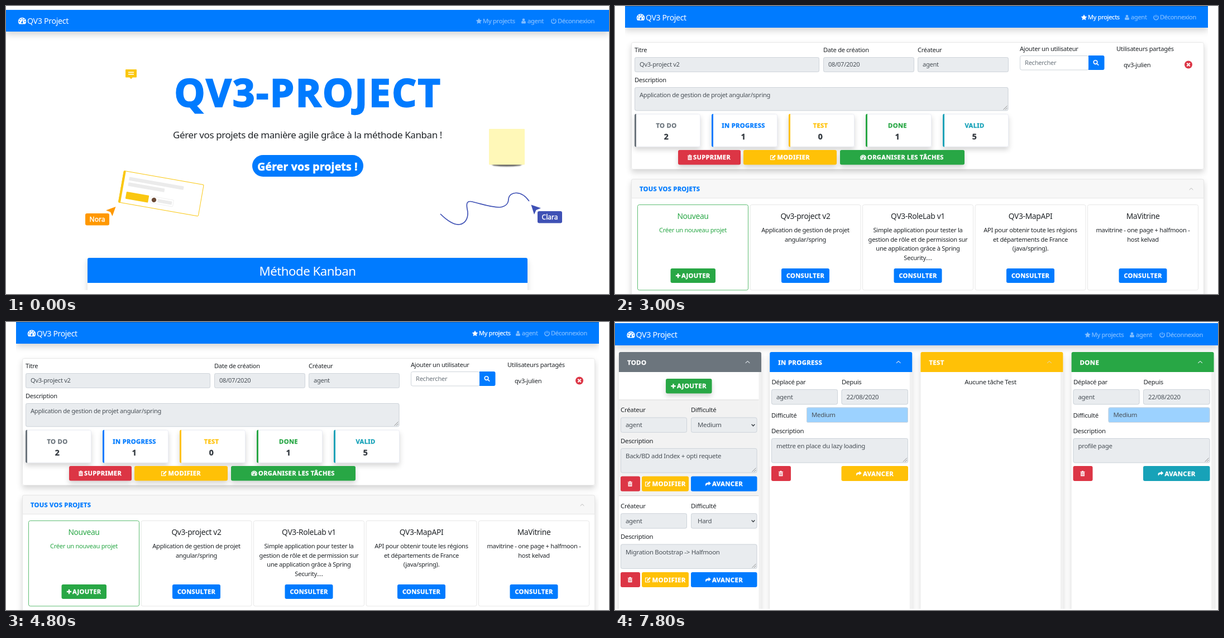
Write an HTML page with a canvas that moves like this. It is 1080 px wide and 518 px high and loops after 9 s.

```html
<!DOCTYPE html>
<html lang="fr">
<head>
<meta charset="utf-8">
<title>QV3 Project</title>
<style>
html, body { margin: 0; width: 100%; height: 100%; overflow: hidden; background: #fff; }
canvas { display: block; }
</style>
</head>
<body>
<canvas id="stage" width="1080" height="518"></canvas>
<script>
const ctx = document.getElementById('stage').getContext('2d');
const FONT = '"Noto Sans", "Open Sans", sans-serif';
const BLUE = '#007bff', GREEN = '#28a745', YELLOW = '#ffc107', RED = '#dc3545';
const TEAL = '#17a2b8', GREY = '#6c757d', INDIGO = '#3f51b5', ORANGE = '#ff9800', GOLD = '#fac710';
const INK = '#212529', FIELD = '#e9ecef', EDGE = '#ced4da', SOFT = '#495057';
const USER = 'agent';

const dot = (x, y, r) =>
  `M${x - r} ${y}a${r} ${r} 0 1 0 ${2 * r} 0a${r} ${r} 0 1 0 ${-2 * r} 0Z`;

// Icons on a 16 x 16 grid: filled path, stroked path, stroke width.
const ICONS = {
  gauge: { fill: 'M1.8 14Q0 11.5 0 9A8 8 0 0 1 16 9Q16 11.5 14.2 14Z' + dot(2.6, 9, 1.1) +
    dot(4.2, 5.2, 1.1) + dot(8, 3.6, 1.1) + dot(11.8, 5.2, 1.1) + dot(13.4, 9, 1.1) +
    'M8.6 6L9.6 6.3 8.9 9.3A1.9 1.9 0 1 1 7.8 9Z' },
  star: { fill: 'M8 .3L10.4 5.2 15.8 6 11.9 9.8 12.8 15.2 8 12.7 3.2 15.2 4.1 9.8.2 6 5.6 5.2Z' },
  user: { fill: dot(8, 4.6, 3.6) + 'M2 13Q2 8 4.8 7.8Q8 10.4 11.2 7.8Q14 8 14 13Q14 15 12 15H4Q2 15 2 13Z' },
  power: { line: 'M4.6 3.4A6 6 0 1 0 11.4 3.4M8 1V8', w: 2 },
  trash: { fill: 'M2 3H5.3L6.2 1H9.8L10.7 3H14V4.5H2ZM3 5H13V15H3ZM5 7V13H6V7ZM7.5 7V13H8.5V7ZM10 7V13H11V7Z' },
  plus: { fill: 'M6.3 2H9.7V6.3H14V9.7H9.7V14H6.3V9.7H2V6.3H6.3Z' },
  edit: { fill: 'M5.5 8.2L12.5 1.2 15.2 3.9 8.2 10.9H5.5Z', line: 'M12 10V14H1.5V3.5H8', w: 1.7 },
  share: { fill: 'M9.5 1.5L15.8 7 9.5 12.5V9.4Q3.6 9 2.6 14.5Q-2 4.8 9.5 4.6Z' },
  search: { line: dot(6.6, 6.6, 4.8) + 'M10.2 10.2L14.8 14.8', w: 2.4 },
  cross: { line: 'M4 4L12 12M12 4L4 12', w: 3 },
  up: { line: 'M2 11L8 5.5 14 11', w: 1.7 },
  down: { line: 'M3 5.5L8 10.5 13 5.5', w: 2.6 }
};

function icon(name, cx, cy, size, color) {
  const { fill, line, w } = ICONS[name];
  ctx.save();
  ctx.translate(cx - size / 2, cy - size / 2);
  ctx.scale(size / 16, size / 16);
  ctx.fillStyle = ctx.strokeStyle = color;
  if (fill) ctx.fill(new Path2D(fill), 'evenodd');
  if (line) {
    ctx.lineWidth = w;
    ctx.stroke(new Path2D(line));
  }
  ctx.restore();
}

// y is the middle of the capitals; gap and weight are in em.
function text(str, x, y, size, color = INK, { bold, align = 'left', gap, weight = bold ? 0.03 : 0 } = {}) {
  const caps = str === str.toUpperCase();
  const em = gap ?? (bold ? (caps ? 0.03 : 0.008) : -0.024);
  ctx.font = `${bold ? 700 : 400} ${size}px ${FONT}`;
  ctx.letterSpacing = em * size + 'px';
  ctx.textAlign = align;
  ctx.fillStyle = ctx.strokeStyle = color;
  ctx.fillText(str, x, y + size * 0.36);
  if (weight) {
    ctx.lineWidth = weight * size;
    ctx.lineJoin = 'miter';
    ctx.miterLimit = 3;
    ctx.strokeText(str, x, y + size * 0.36);
  }
}
const center = (str, x, y, size, color, opt) => text(str, x, y, size, color, { ...opt, align: 'center' });

function box(x, y, w, h, { fill = '#fff', edge, r = 3, shadow, line = 0.75 } = {}) {
  ctx.save();
  if (shadow) {
    ctx.shadowColor = 'rgba(0,0,0,.17)';
    ctx.shadowBlur = shadow;
    ctx.shadowOffsetY = shadow / 2;
  }
  ctx.fillStyle = fill;
  ctx.beginPath();
  ctx.roundRect(x, y, w, h, r);
  ctx.fill();
  ctx.restore();
  if (edge) {
    ctx.strokeStyle = edge;
    ctx.lineWidth = line;
    ctx.beginPath();
    ctx.roundRect(x + 0.5, y + 0.5, w - 1, h - 1, r);
    ctx.stroke();
  }
}

function poly(points, color) {
  ctx.fillStyle = color;
  ctx.beginPath();
  points.forEach(([x, y]) => ctx.lineTo(x, y));
  ctx.fill();
}

function clipTo(x, y, w, h) {
  ctx.beginPath();
  ctx.rect(x, y, w, h);
  ctx.clip();
}

function field(x, y, w, h, str, size, { fill = FIELD, color = SOFT, pad = 9 } = {}) {
  box(x, y, w, h, { fill, edge: EDGE, line: 1 });
  text(str, x + pad, y + Math.min(h / 2, 14), size, color);
}

function area(x, y, w, h, str, size) {
  field(x, y, w, h, str, size);
  ctx.strokeStyle = '#777';
  ctx.lineWidth = 0.8;
  ctx.beginPath();
  for (const d of [7, 3.5]) {
    ctx.moveTo(x + w - 2 - d, y + h - 2);
    ctx.lineTo(x + w - 2, y + h - 2 - d);
  }
  ctx.stroke();
}

function button(x, y, w, h, fill, str, size, name, iconX, textX, shadow) {
  box(x, y, w, h, { fill, shadow });
  const mid = y + h / 2;
  if (name) icon(name, iconX, mid, 11, '#fff');
  if (!str) return;
  if (textX) text(str, textX, mid, size, '#fff', { bold: true });
  else center(str, x + w / 2, mid, size, '#fff', { bold: true });
}

function navbar(x, y, w, h, mid, logoX, size, links, active) {
  box(x, y, w, h, { fill: BLUE, r: 0, shadow: 11 });
  icon('gauge', logoX, mid, 14.5, '#fff');
  text('QV3 Project', logoX + 9, mid, size * 1.27, '#fff');
  const labels = ['My projects', USER, 'Déconnexion'];
  ['star', 'user', 'power'].forEach((name, i) => {
    const color = active && i === 0 ? '#fff' : '#80bdff';
    icon(name, links[i] - 7, mid, i === 1 ? 10.5 : 11, color);
    text(labels[i], links[i], mid, size, color, { weight: 0.02 });
  });
}

function noteCard() {
  ctx.save();
  ctx.translate(211, 295.8);
  ctx.rotate(Math.PI / 18);
  box(0, 0, 146, 58.5, { edge: GOLD, r: 2, line: 1 });
  box(0, 0, 4, 58.5, { fill: GOLD, r: 2 });
  box(12, 9.5, 99, 6.5, { fill: '#ebebeb', r: 1 });
  box(12, 19.5, 66, 6.5, { fill: '#ebebeb', r: 1 });
  box(11.5, 36.5, 41, 13, { fill: GOLD, r: 1 });
  box(56, 36.5, 42, 13, { edge: '#ebebeb', r: 1 });
  box(58.2, 38.7, 8.4, 8.4, { fill: '#6b4a35', r: 4.2 });
  box(69, 40, 26, 6, { fill: '#ebebeb', r: 1 });
  ctx.restore();
}

function tag(x, y, w, name, color) {
  box(x, y, w, 21.5, { fill: color });
  center(name, x + w / 2, y + 10.5, 12, '#fff', { gap: 0, weight: 0.035 });
}

function home() {
  clipTo(0, 0, 1080, 511);
  navbar(0, 7, 1080, 39, 27, 29, 11.2, [854, 934, 988]);

  box(214, 114, 20, 14.5, { fill: GOLD, r: 1 });
  poly([[221, 128], [227, 128], [224, 131.5]], GOLD);
  box(219, 118.5, 10, 1.6, { r: 0 });
  box(219, 122, 10, 1.6, { r: 0 });

  center('QV3-PROJECT', 541, 156, 69, BLUE, { bold: true, gap: 0.038, weight: 0.035 });
  center('Gérer vos projets de manière agile grâce à la méthode Kanban !', 540, 232, 17);
  box(441, 268, 199, 39, { fill: BLUE, r: 19.5 });
  center('Gérer vos projets !', 540, 288.5, 19.5, '#fff', { bold: true });

  ctx.save();
  ctx.filter = 'blur(1.3px)';
  ctx.fillStyle = 'rgba(0,0,0,.65)';
  ctx.fill(new Path2D('M868 283H926L921 287Q897 290 873 287Z'));
  ctx.restore();
  box(865, 221, 64, 64.5, { fill: '#fff8b8', r: 1 });

  noteCard();
  poly([[196.5, 361], [179, 367.5], [187, 370.5], [190.5, 378]], ORANGE);
  tag(142, 373, 43, 'Nora', ORANGE);

  ctx.strokeStyle = INDIGO;
  ctx.lineWidth = 1.7;
  ctx.stroke(new Path2D('M778 374C790 386 803 394 812 393C826 391 829 376 826 365' +
    'C824 354 826 350 835 352C852 356 868 362 884 362C896 361 900 354 900 347C902 333 923 331 937 351'));
  poly([[940.5, 357.5], [958, 363.5], [949.5, 367], [946, 375]], INDIGO);
  tag(952, 369, 44, 'Clara', INDIGO);

  box(146, 453, 788, 90, { shadow: 11 });
  box(146, 453, 788, 45, { fill: BLUE, r: [3, 3, 0, 0] });
  center('Méthode Kanban', 540, 476.5, 22.3, '#fff');
}

function projects() {
  const S = 11.1;
  clipTo(18, 0, 1044, 518);
  navbar(18, 0, 1044, 39, 20.5, 46, 11, [847, 924, 976], true);
  box(18, 0, 1044, 1, { fill: '#0a63c4', r: 0 });

  box(29, 65, 1026, 229, { edge: '#dfdfdf', shadow: 11 });
  [['Titre', 35, 79], ['Date de création', 373, 79], ['Créateur', 542, 79], ['Description', 35, 133],
    ['Ajouter un utilisateur', 725, 77.5], ['Utilisateurs partagés', 898, 77.5]]
    .forEach(([str, x, y]) => text(str, x, y, S));
  field(35, 92, 331, 27, 'Qv3-project v2', S);
  field(373, 92, 163, 27, '08/07/2020', S);
  field(542, 92, 163, 27, USER, S);
  area(35, 146, 669.5, 42.5, 'Application de gestion de projet angular/spring', S);
  field(725, 89, 124, 26.5, 'Rechercher', S, { fill: '#fff', color: GREY });
  box(848, 89, 28.5, 26, { fill: BLUE, r: [0, 3, 3, 0] });
  icon('search', 861.5, 102, 11, '#fff');
  text('qv3-julien', 911, 106, S);
  box(1020, 98.5, 14, 14, { fill: RED, r: 7 });
  icon('cross', 1027, 105.5, 11, '#fff');

  [['TO DO', 2, GREY], ['IN PROGRESS', 1, BLUE], ['TEST', 0, YELLOW], ['DONE', 1, GREEN], ['VALID', 5, TEAL]]
    .forEach(([name, count, color], i) => {
      const x = 35 + 138 * i;
      box(x, 194, 118, 59.5, { edge: '#e3e6f0', shadow: 10 });
      box(x, 194, 3, 59.5, { fill: color, r: [3, 0, 0, 3] });
      center(name, x + 57, 215, 11.2, color, { bold: true });
      center(String(count), x + 57, 234.5, 14, '#343a40', { bold: true });
    });
  button(113, 259, 112, 26.5, RED, 'SUPPRIMER', S, 'trash', 134, 140, 10);
  button(230, 259, 167, 26.5, YELLOW, 'MODIFIER', S, 'edit', 283, 290.5, 10);
  button(403, 259, 223, 26.5, GREEN, 'ORGANISER LES TÂCHES', S, 'gauge', 444.5, 452, 10);

  box(29, 311, 1026, 240, { edge: '#dfdfdf', shadow: 11 });
  box(29, 311, 1026, 35, { fill: '#f7f7f7', edge: '#dfdfdf', r: [3, 3, 0, 0] });
  text('TOUS VOS PROJETS', 44, 329, S, BLUE, { bold: true });
  icon('up', 1032, 329, 9, '#b5b5b5');

  [['Nouveau', 'Créer un nouveau projet'],
    ['Qv3-project v2', 'Application de gestion de projet', 'angular/spring'],
    ['QV3-RoleLab v1', 'Simple application pour tester la', 'gestion de rôle et de permission sur',
      'une application grâce à Spring', 'Security.…'],
    ['QV3-MapAPI', 'API pour obtenir toute les régions', 'et départements de France', '(java/spring).'],
    ['MaVitrine', 'mavitrine - one page + halfmoon -', 'host kelvad']]
    .forEach(([name, ...lines], i) => {
      const x = 40 + 201.5 * i, mid = x + 99.5, color = i ? INK : GREEN;
      box(x, 357, 199, 154.5, { edge: i ? '#dfdfdf' : GREEN });
      center(name, mid, 378, 13.8, color);
      lines.forEach((line, k) => center(line, mid, 403 + 16.6 * k, S, color));
      if (i) button(mid - 43, 472, 86, 26, BLUE, 'CONSULTER', S);
      else button(99.5, 472, 80.5, 26, GREEN, 'AJOUTER', S, 'plus', 113, 119);
    });
}

function task(y, level, note) {
  const S = 11.4;
  text('Créateur', 10, y, S);
  text('Difficulté', 136, y, S);
  field(10, y + 13.5, 119, 27.5, USER, S);
  field(136, y + 13.5, 118.5, 27.5, level, S, { pad: 12 });
  icon('down', 247.5, y + 27.5, 9, '#343a40');
  text('Description', 10, y + 55.5, S);
  area(10, y + 69, 244.5, 44.5, note, S);
  button(10, y + 119.5, 35, 27, RED, '', S, 'trash', 27);
  button(48, y + 119.5, 84, 27, YELLOW, 'MODIFIER', S, 'edit', 59, 66.5);
  button(136, y + 119.5, 118.5, 27, BLUE, 'AVANCER', S, 'share', 166.5, 174);
}

function movedTask(x, note, color) {
  const S = 11.4;
  text('Déplacé par', x + 3.5, 107.5, S);
  text('Depuis', x + 129, 107.5, S);
  field(x + 3, 121, 119, 27.5, USER, S);
  field(x + 128.5, 121, 119.5, 27.5, '22/08/2020', S);
  text('Difficulté', x + 3, 168, S);
  field(x + 66, 153.5, 182, 27.5, 'Medium', S, { fill: '#9cd2ff' });
  text('Description', x + 3, 196, S);
  area(x + 3, 209, 245, 44.5, note, S);
  button(x + 3, 259, 35, 27, RED, '', S, 'trash', x + 20);
  button(x + 128.5, 259, 119.5, 27, color, 'AVANCER', S, 'share', x + 159.5, x + 167);
}

function board() {
  const S = 11.4;
  clipTo(0, 0, 1080, 516);
  navbar(0, 2, 1080, 40, 23, 28.5, 11.2, [853.5, 933, 987]);

  [['TODO', GREY], ['IN PROGRESS', BLUE], ['TEST', YELLOW], ['DONE', GREEN]].forEach(([name, color], i) => {
    const x = 7 + 270.2 * i;
    box(x, 54, 255, 500, { shadow: 11 });
    box(x + 250.5, 90, 4.5, 460, { fill: '#f1f1f1', r: 0 });
    box(x, 54, 255, 36, { fill: color, r: [3, 3, 0, 0] });
    text(name, x + 15, 72.5, S, '#fff', { bold: true });
    icon('up', x + 230.5, 72, 10, i === 2 ? '#e3d3a0' : '#e4eaf0');
  });

  box(7, 140, 250.5, 172, { fill: '#f2f2f2', r: 0 });
  box(7, 139.5, 250.5, 1, { fill: '#dcdcdc', r: 0 });
  box(7, 312, 250.5, 1, { fill: '#d5d5d5', r: 0 });
  button(91, 102, 82.5, 26.5, GREEN, 'AJOUTER', S, 'plus', 104.5, 111, 10);
  task(158, 'Medium', 'Back/BD add Index + opti requete');
  task(330.5, 'Hard', 'Migration Bootstrap -> Halfmoon');
  movedTask(277, 'mettre en place du lazy loading', YELLOW);
  center('Aucune tâche Test', 672.5, 107.5, S);
  movedTask(817.5, 'profile page', TEAL);
}

const SCENES = [home, projects, board];
const HOLD = 3000;
let start;

function draw(now) {
  start ??= now;
  const scene = SCENES[Math.floor((now - start) / HOLD) % SCENES.length];
  ctx.fillStyle = '#fff';
  ctx.fillRect(0, 0, 1080, 518);
  ctx.save();
  scene();
  ctx.restore();
  requestAnimationFrame(draw);
}
requestAnimationFrame(draw);
</script>
</body>
</html>
```
